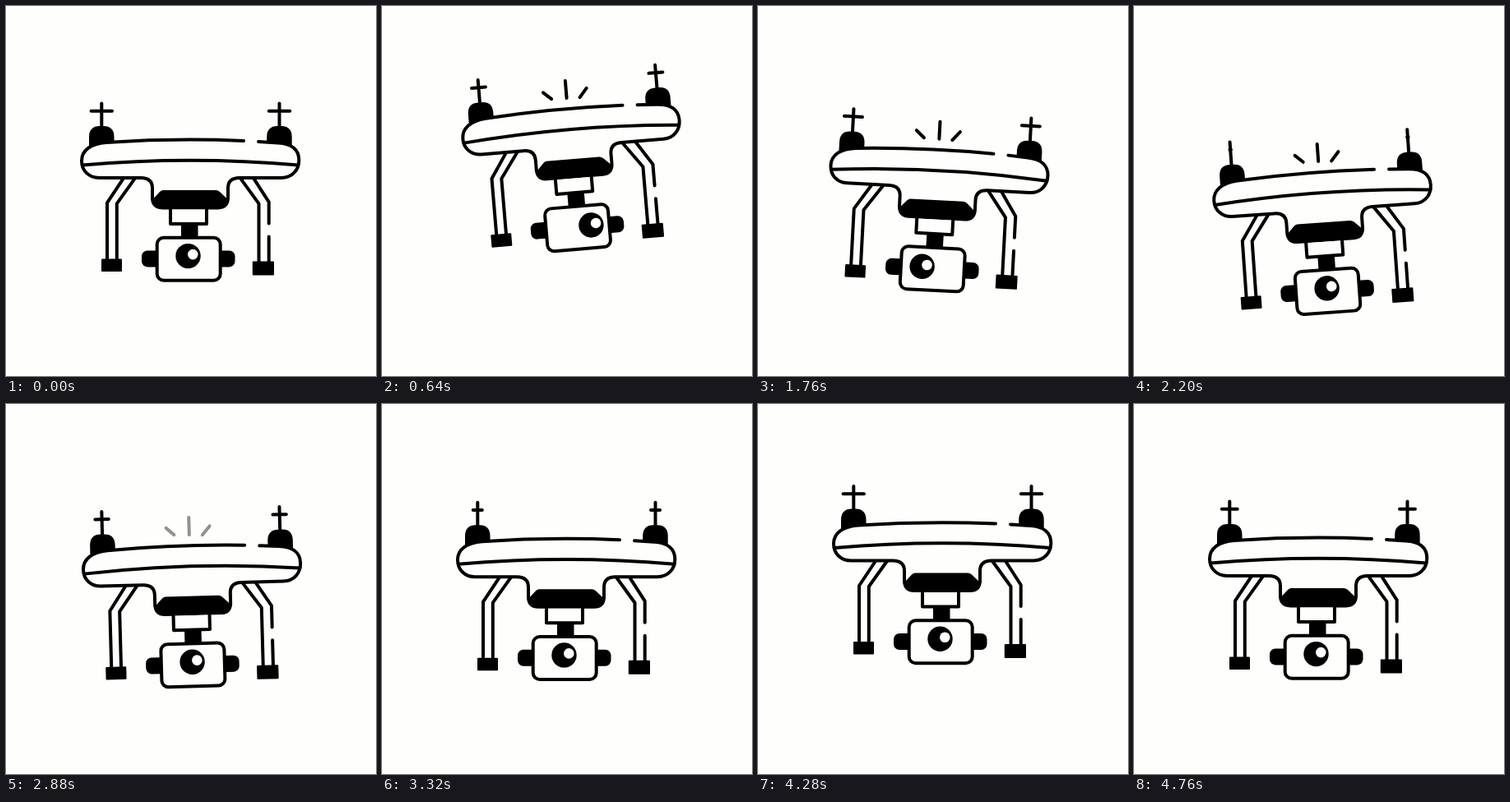
An HTML page for the animation above (4.8 s loop, 450 by 450 pixels).

```html
<!DOCTYPE html>
<html lang="en">
<head>
<meta charset="utf-8">
<title>Hovering drone</title>
<style>
  html, body { margin: 0; width: 100%; height: 100%; overflow: hidden; background: #fefefc; }
  svg { display: block; width: 100vw; height: 100vh; }
  .line { fill: none; stroke: #000; stroke-width: 4; stroke-linecap: round; stroke-linejoin: round; }
  .skin { fill: #fefefc; }
</style>
</head>
<body>
<svg viewBox="0 0 450 450">
  <g id="drone">
    <path id="sparks" class="line" d="M194 140L203.500 148.500M222 128V149M247 139L238 149.500"/>

    <g id="rotor">
      <path class="line" d="M116.300 118V150"/>
      <path id="blade" class="line"/>
      <path d="M101 170V159Q101 145.500 114 145.500H118.500Q131.500 145.500 131.500 159V170Z"/>
    </g>
    <use href="#rotor" x="216.200"/>

    <!-- legs -->
    <path class="line" d="M143 209L123 239V308M157 209L134.800 240V308"/>
    <path class="line" d="M285 209L307.500 240V311M301 209L319.700 238V264M319.700 280V311"/>
    <rect x="116" y="307" width="25" height="15.500" rx="1"/>
    <rect x="299.800" y="310" width="26.200" height="17" rx="1"/>

    <!-- hull: the open outline leaves a gap near the right rotor -->
    <path class="line skin" d="M289 163.500Q205 160 122 165.500C103 167 92 175 92 188C92 200 101 208.500 113 208.500H164Q178 208.500 178 221V234Q179 245 190 245H258Q269 245 270 234V221Q270 208.500 284 208.500H335C348 208.500 356.300 199 356.300 187C356.300 174 347 167 331 166L307 164.500"/>
    <path class="line" d="M93 193Q224 181.500 355.500 193"/>
    <path d="M191 223.500H255Q258 223.500 260 225.500L270 235Q268 246 257 246H191Q180 246 178 235L187 225.500Q189 223.500 191 223.500Z"/>

    <!-- camera -->
    <path class="line skin" d="M200 247V264.500H244V247"/>
    <rect x="213" y="264" width="20.500" height="18"/>
    <rect x="165" y="297" width="113.500" height="20" rx="7"/>
    <rect class="line skin" x="183.700" y="281.300" width="77" height="52" rx="8"/>
    <g id="lens">
      <circle cx="221.500" cy="303.700" r="15.200"/>
      <circle class="skin" cx="227.300" cy="301.700" r="6.300"/>
    </g>
  </g>
</svg>
<script>
const LOOP = 4800, STEP = 40, HALF_TURNS = 28;
const el = id => document.getElementById(id);
const drone = el('drone'), sparks = el('sparks'), blade = el('blade'), lens = el('lens');

const ramp = (t, a, b) => {
  const u = Math.min(1, Math.max(0, (t - a) / (b - a)));
  return u * u * (3 - 2 * u);
};

// Eases from one [time, value] pose to the next.
const poses = (...keys) => t => keys.slice(1).reduce(
  (v, [time, value], i) => v + (value - keys[i][1]) * ramp(t, keys[i][0], time), keys[0][1]);

const height = poses([0, 0], [900, -47], [2280, 40.3], [3160, 0], [3740, 7], [4260, -18.5], [4760, 0]);
const tilt = poses([0, 0], [560, -5], [1520, 5], [2360, -5], [3190, 0]);
const gaze = poses([0, 0], [640, 17.3], [1560, -16.3], [2160, 0]);
const glow = poses([400, 0], [620, 1], [2760, 1], [2980, 0]);

function draw(t) {
  const y = height(t), look = gaze(t);
  drone.setAttribute('transform', `translate(0 ${y + 0.4}) rotate(${tilt(t)} 224.5 118)`);
  lens.setAttribute('transform', `translate(${look} ${Math.abs(look) * 0.1})`);
  sparks.setAttribute('opacity', glow(t));

  // Steady spin that lags while the drone hangs low
  const turn = HALF_TURNS * t / LOOP - Math.max(0, y) / 125;
  const half = 12.7 * Math.abs(Math.cos(Math.PI * turn));
  blade.setAttribute('d', `M${116.3 - half} 127.300h${2 * half}`);
}

const start = performance.now();
function tick() {
  const t = (performance.now() - start) % LOOP;
  draw(Math.floor(t / STEP) * STEP);
  requestAnimationFrame(tick);
}
draw(0);
requestAnimationFrame(tick);
</script>
</body>
</html>
```
